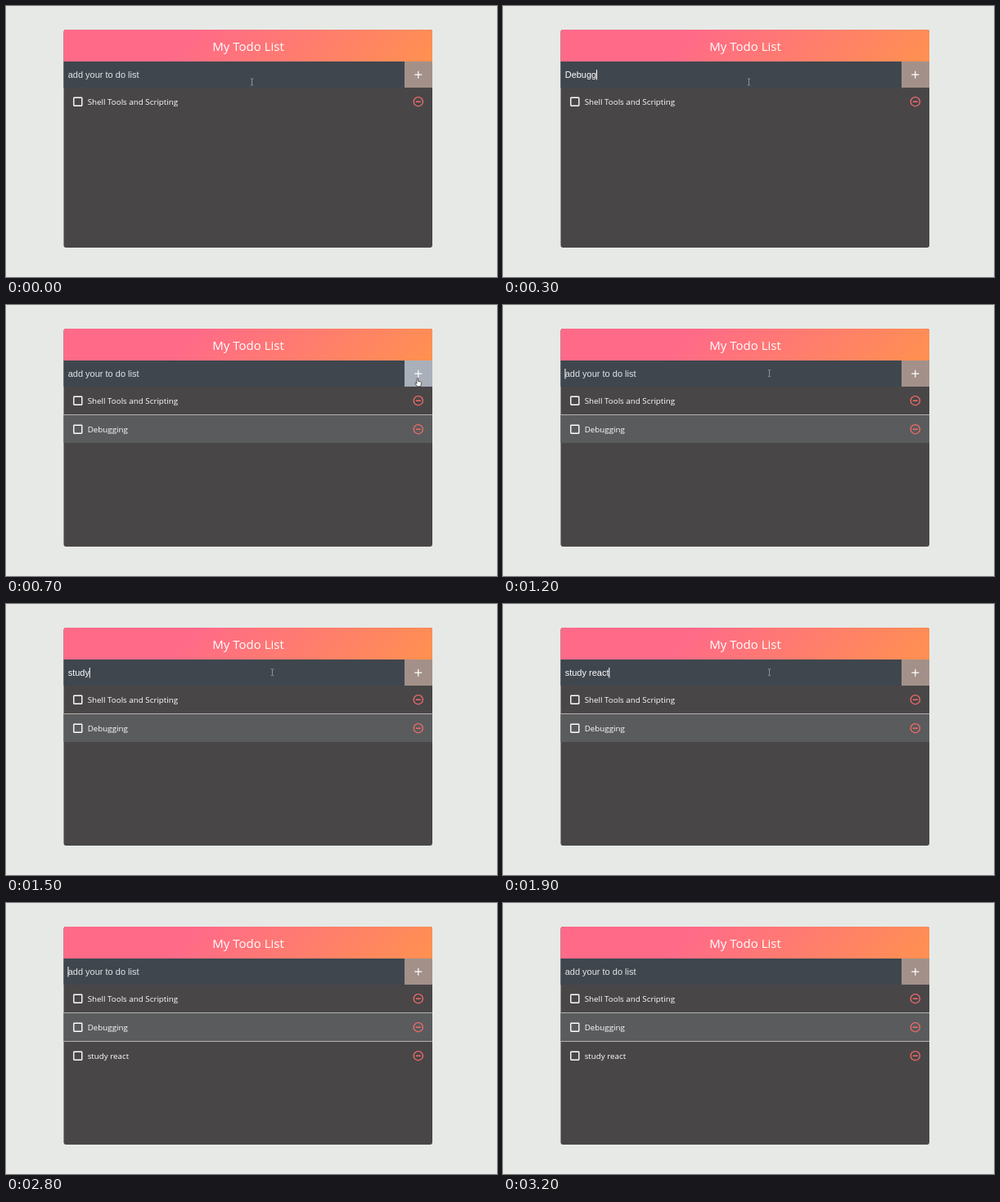
Write an HTML page that moves like this. It is 600 px wide and 332 px high and loops after 3.3 s.

```html
<!DOCTYPE html>
<html lang="en">
<head>
<meta charset="utf-8">
<title>My Todo List</title>
<style>
  html, body { margin: 0; width: 100%; height: 100%; overflow: hidden; background: #e7e9e6; }
  svg { display: block; width: 100vw; height: 100vh; }
  .title { font: 15px "Open Sans", "Noto Sans", sans-serif; fill: #fff; text-anchor: middle; }
  .item { font: 9.8px "Open Sans", "Noto Sans", sans-serif; fill: #fff; }
  .field { font: 11px "Liberation Sans", Arial, sans-serif; }
</style>
</head>
<body>
<svg viewBox="0 0 600 332">
  <defs>
    <linearGradient id="warm" gradientUnits="userSpaceOnUse" x1="173.5" y1="-74" x2="418" y2="171">
      <stop offset="0" stop-color="#ff6a89"/>
      <stop offset=".33" stop-color="#ff6a89"/>
      <stop offset="1" stop-color="#ff9150"/>
    </linearGradient>
    <clipPath id="card"><rect x="70.5" y="29" width="450.5" height="267" rx="3"/></clipPath>
  </defs>
  <rect width="600" height="332" fill="#e7e9e6"/>
  <g clip-path="url(#card)">
    <rect x="70" y="29" width="452" height="268" fill="#494648"/>
    <rect x="70" y="29" width="452" height="39.5" fill="url(#warm)"/>
    <rect x="70" y="68" width="417" height="32" fill="#3f464e"/>
    <rect id="button" x="487" y="68" width="35" height="32"/>
    <g id="rows"></g>
  </g>
  <text class="title" x="296" y="55">My Todo List</text>
  <path d="M499.3 84.2h9M503.8 79.7v9" stroke="#fff" stroke-width="1.2"/>
  <text id="field" class="field" x="75.7" y="88"></text>
  <rect id="caret" y="78" width="1" height="12.5" fill="#fff"/>
  <g id="mouse">
    <path id="beam" d="M-1.7 -4h1.2l.5 .5 .5 -.5h1.2M0 -3.5v7M-1.7 4h1.2l.5 -.5 .5 .5h1.2" fill="none" stroke="#a4a8ab" stroke-width=".8"/>
    <path id="arrow" d="M0 0v9l2.1 -2 1.5 3.2 1.4 -.6 -1.4 -3.1h2.9z" fill="#fff" stroke="#222" stroke-width=".6"/>
    <path id="hand" d="M-1 -4.6q.9 -1 1.7 0v3.2l3.1 .8q.9 .4 .8 1.4l-.5 2.6 -.6 1.6h-4l-2.4 -3.2q-.5 -1.2 .6 -1.2l1.3 .9z" fill="#fff" stroke="#222" stroke-width=".7"/>
  </g>
</svg>
<script>
const LOOP = 3300, STEP = 100;
const HINT = "add your to do list", FIRST = "Debugging", SECOND = "study react";
const $ = id => document.getElementById(id);
const show = (el, on) => el.setAttribute("visibility", on ? "visible" : "hidden");

function makeRow(label, i) {
  const y = 100 + i * 35, mid = y + 17.2;
  return `<g>
    ${i === 1 ? `<rect x="70" y="${y}" width="452" height="34" fill="#5a5b5d"/>` : ""}
    ${i ? `<rect x="70" y="${y - 1}" width="452" height="1" fill="#b3b2ad"/>` : ""}
    <rect x="82.8" y="${mid - 5}" width="10" height="10" rx=".7" fill="none" stroke="#fff" stroke-width="1.4"/>
    <text class="item" x="99.7" y="${mid + 4.1}">${label}</text>
    <circle cx="503.8" cy="${mid}" r="5.6" fill="none" stroke="#f06b69" stroke-width="1.3"/>
    <path d="M500.8 ${mid}h6" stroke="#f06b69" stroke-width="1.4"/>
  </g>`;
}
$("rows").innerHTML = ["Shell Tools and Scripting", FIRST, SECOND].map(makeRow).join("");
const rows = [...$("rows").children];

// Letters typed at each step, from the step the typing starts
const typing = [
  { text: FIRST, from: 1, until: 7, counts: [1, 3, 6, 9] },
  { text: SECOND, from: 13, until: 22, counts: [1, 3, 5, 6, 8, 10, 11] }
];
const caretSteps = new Set([1, 2, 3, 4, 12, 13, 14, 15, 16, 17, 18, 19, 21, 23, 25, 28, 30, 31]);
// Start step, pointer kind, x, y
const pointer = [
  [0, "beam", 300.5, 93], [5, "arrow", 440, 46], [6, "hand", 498, 96.3],
  [7, "hand", 503, 94.8], [8, "hand", 495, 92], [9, "beam", 430, 88],
  [10, "beam", 352, 85], [11, "beam", 325.5, 83.7], [24, "none", 0, 0]
];

function typed(step) {
  const run = typing.find(r => step >= r.from && step < r.until);
  if (!run) return "";
  const i = Math.min(step - run.from, run.counts.length - 1);
  return run.text.slice(0, run.counts[i]);
}

function draw(time) {
  const step = Math.floor((time % LOOP) / STEP);
  const text = typed(step), field = $("field");
  field.textContent = text || HINT;
  field.setAttribute("fill", text ? "#fff" : "#e3e6e8");
  const width = text ? field.getComputedTextLength() : 0;
  $("caret").setAttribute("x", 75.5 + width);
  show($("caret"), caretSteps.has(step));

  show(rows[1], step >= 7);
  show(rows[2], step >= 22);
  $("button").setAttribute("fill", step === 7 || step === 8 ? "#a9b0ba" : "#a39189");

  const [, kind, x, y] = pointer.findLast(p => step >= p[0]);
  $("mouse").setAttribute("transform", `translate(${x} ${y})`);
  for (const id of ["beam", "arrow", "hand"]) show($(id), id === kind);
}

const start = performance.now();
function tick() {
  draw(performance.now() - start);
  requestAnimationFrame(tick);
}
tick();
</script>
</body>
</html>
```
